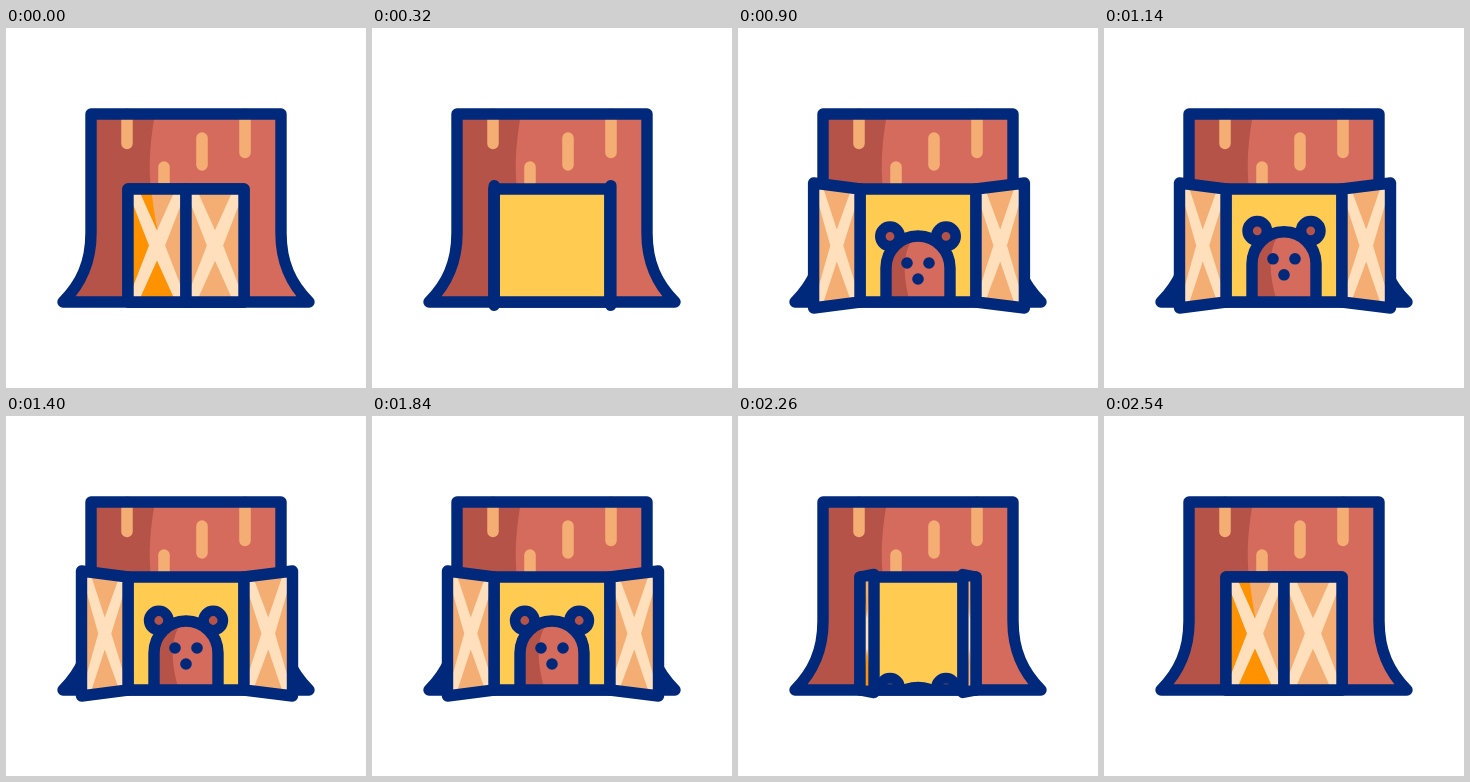
An HTML page with a canvas for the animation above (3.6 s loop, 360 px wide and 360 px high).

```html
<!DOCTYPE html>
<html lang="en">
<head>
<meta charset="utf-8">
<title>Bear in a tree house</title>
<style>
html, body { margin: 0; width: 100%; height: 100%; overflow: hidden; background: #fff; }
canvas { display: block; width: 360px; height: 360px; }
</style>
</head>
<body>
<canvas id="stage" width="360" height="360"></canvas>
<script>
const LOOP = 3600;
const NAVY = '#00287b', RED = '#d56b5d', DARK = '#b55348', PEACH = '#f4ae74',
      CREAM = '#ffdfbc', YELLOW = '#ffcb51', ORANGE = '#ff9200';
const ctx = document.getElementById('stage').getContext('2d');
ctx.lineCap = ctx.lineJoin = 'round';

const trunk = new Path2D('M85 86H275V205C275 235 285 256 303 274H57C75 256 85 235 85 205Z');
const trunkShade = new Path2D('M149 86C141 130 144 155 146 167C150 205 160 240 174 274H40V86Z');
const doorway = new Path2D('M122 274V161H238V274Z');
const bearBody = new Path2D('M148 380V237A32 32 0 0 1 212 237V380Z');
const bearShade = new Path2D('M180 203C163 215 163 250 176 282L190 380H140V200Z');

const clamp = (x, a, b) => Math.min(b, Math.max(a, x));
const span = (t, a, b) => clamp((t - a) / (b - a), 0, 1);
const quad = u => u < .5 ? 2 * u * u : 1 - 2 * (1 - u) ** 2;
const cubic = u => u < .5 ? 4 * u ** 3 : 1 - 4 * (1 - u) ** 3;

function fill(path, color) {
  ctx.fillStyle = color;
  ctx.fill(path);
}

function stroke(path, width = 11.4, color = NAVY) {
  ctx.strokeStyle = color;
  ctx.lineWidth = width;
  ctx.stroke(path);
}

function clipped(path, draw) {
  ctx.save();
  ctx.clip(path);
  draw();
  ctx.restore();
}

function poly(points) {
  const path = new Path2D();
  points.forEach(p => path.lineTo(...p));
  path.closePath();
  return path;
}

function circle(x, y, r) {
  const path = new Path2D();
  path.arc(x, y, r, 0, Math.PI * 2);
  return path;
}

// 0 = shut, 1 = wide open
function doorAt(t) {
  if (t < 1800) return 1 - Math.exp(-((t / 356) ** 2.1));
  return 1 - quad(span(t, 1920, 2550));
}

// vertical offset of the bear from its resting place
const rise = [[300, 85], [600, -9.5], [890, 3], [1140, -1.2], [1400, 0]];
function bearAt(t) {
  if (t > 1800) return 85 * cubic(span(t, 1820, 2530));
  let y = rise[0][1];
  for (let i = 1; i < rise.length; i++) {
    const [t0, y0] = rise[i - 1], [t1, y1] = rise[i];
    if (t > t0) y = y0 + (y1 - y0) * (1 - Math.cos(Math.PI * span(t, t0, t1))) / 2;
  }
  return y;
}

function drawTrunk() {
  fill(trunk, RED);
  clipped(trunk, () => fill(trunkShade, DARK));
  for (const [x, a, b] of [[121, 86, 115.5], [158, 139, 161], [196, 110, 137], [239, 86, 124.5]])
    stroke(new Path2D(`M${x} ${a}V${b}`), 11.5, PEACH);
  stroke(trunk);
}

function drawBear(y) {
  const lag = clamp(y * .4, -4, .8);
  ctx.translate(0, y);
  for (const side of [-1, 1]) {
    const ear = circle(180 + side * (27.2 + Math.max(lag, -1.5)), 204.5 + lag, 9.7);
    fill(ear, DARK);
    stroke(ear, 10.6);
  }
  fill(bearBody, RED);
  clipped(bearBody, () => fill(bearShade, DARK));
  stroke(bearBody);
  for (const [cx, cy] of [[169, 232], [191, 232], [180, 248]])
    fill(circle(cx, cy, 5.8), NAVY);
}

function drawDoor(side, open) {
  const hinge = 180 + side * 58;
  const reach = side < 0 ? 104.5 : 106.5;
  const width = side * (reach * open - 58);
  const at = ([u, v]) => [hinge + u * width, 217.5 + v * (56.5 + 6 * open * u)];
  const shape = list => poly(list.map(at));
  const panel = shape([[0, -1], [1, -1], [1, 1], [0, 1]]);
  fill(panel, CREAM);

  const gaps = new Path2D();
  for (const tri of [
    [[0, -.95], [.36, 0], [0, .95]], [[1, -.95], [.64, 0], [1, .95]],
    [[.18, -1], [.5, -.27], [.82, -1]], [[.18, 1], [.5, .27], [.82, 1]]
  ]) gaps.addPath(shape(tri));
  fill(gaps, PEACH);

  // only the outer face of the left door lies in shade
  if (side < 0 && width > 0) clipped(gaps, () => {
    ctx.translate(hinge, 0);
    ctx.scale(width / 58, 1);
    ctx.translate(-hinge, 0);
    fill(trunkShade, ORANGE);
  });
  stroke(panel);
}

function frame(now) {
  const t = now % LOOP;
  const open = doorAt(t);
  ctx.fillStyle = '#fff';
  ctx.fillRect(0, 0, 360, 360);
  drawTrunk();
  fill(doorway, YELLOW);
  clipped(doorway, () => drawBear(bearAt(t)));
  stroke(doorway);
  drawDoor(-1, open);
  drawDoor(1, open);
}

const start = performance.now();
function tick() {
  frame(performance.now() - start);
  requestAnimationFrame(tick);
}
tick();
</script>
</body>
</html>
```
